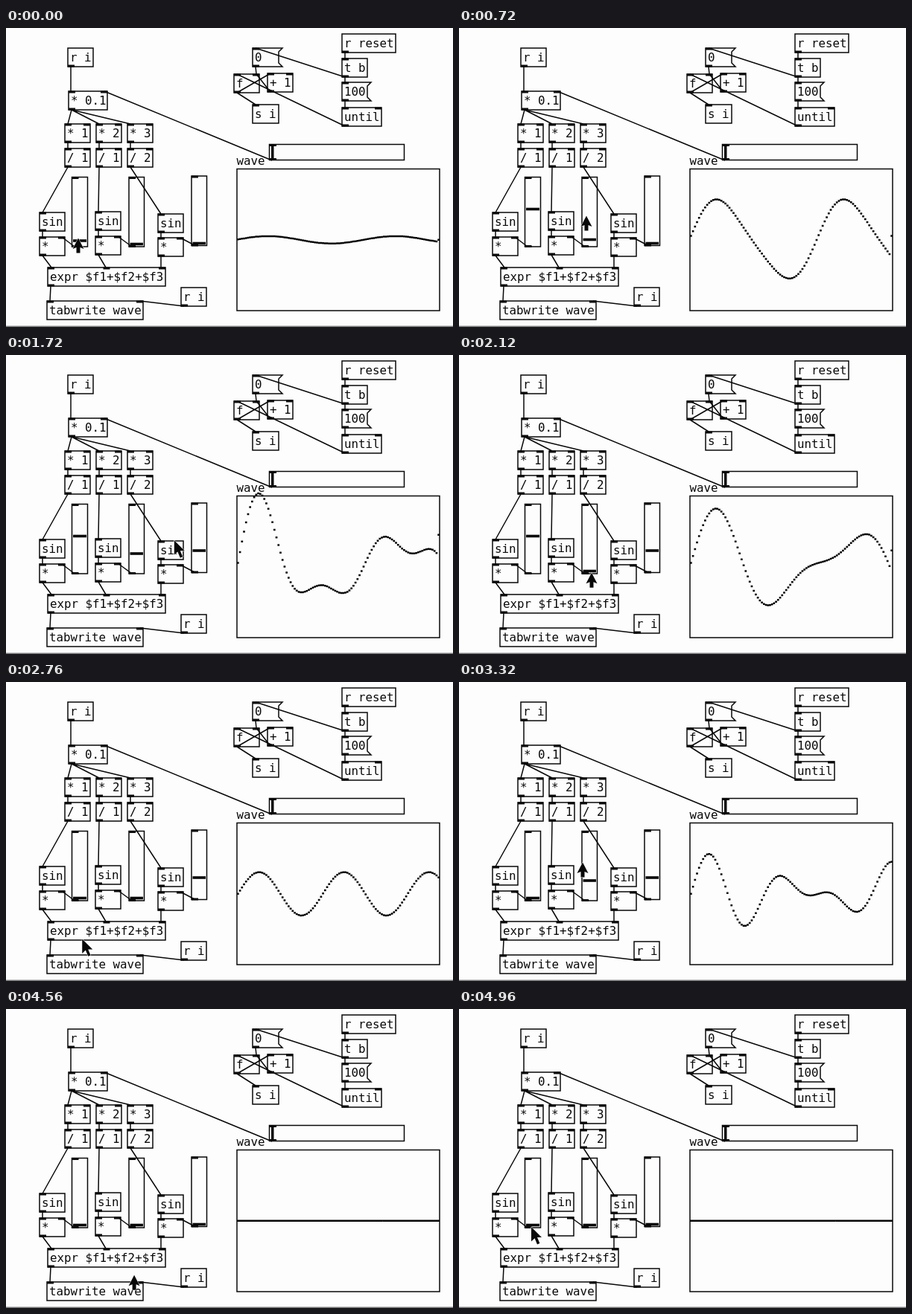
These frames come from a looping animation (600x402 px, 5000 ms). An HTML page:

```html
<!DOCTYPE html>
<html lang="en">
<head>
<meta charset="utf-8">
<title>Additive wave patch</title>
<style>
  html, body { margin: 0; width: 100%; height: 100%; overflow: hidden; background: #fefdfe; }
  svg { display: block; width: 600px; height: 402px; }
  text { font: 15.8px "DejaVu Sans Mono", monospace; white-space: pre; fill: #080808; }
  .line { fill: none; stroke: #080808; stroke-width: 1.5; }
  .solid { fill: #080808; }
  .cursor { fill: #080808; stroke: #fff; stroke-width: 1; paint-order: stroke; }
</style>
</head>
<body>
<svg id="stage" viewBox="0 0 600 402"></svg>
<script>
const stage = document.getElementById('stage');

function add(tag, attrs, text) {
  const el = document.createElementNS('http://www.w3.org/2000/svg', tag);
  for (const k in attrs) el.setAttribute(k, attrs[k]);
  if (text) el.textContent = text;
  return stage.appendChild(el);
}
const path = (d, cls = 'line') => add('path', { d, class: cls });
const frame = (x, y, width, height) => add('rect', { x, y, width, height, class: 'line' });
const bar = (x, y, width, height) => add('rect', { x, y, width, height, class: 'solid' });
const label = (x, y, s) => add('text', { x, y }, s);

// Evenly spread inlets or outlets along a box edge
function ports(x, y, w, n) {
  for (let i = 0; i < n; i++) bar(x + (n > 1 ? i * (w - 9) / (n - 1) : 0), y, 9, 3);
}
function box(x, y, w, s, ins, outs) {
  frame(x, y, w, 25);
  ports(x, y - 0.5, w, ins);
  ports(x, y + 22.5, w, outs);
  label(x + 3, y + 18, s);
}
function message(x, y, w, s) {
  path(`M${x} ${y}h${w}l-5 5v15l5 5h${-w}z`);
  ports(x, y - 0.5, w, 1);
  ports(x, y + 22.5, w, 1);
  label(x + 3, y + 18, s);
}

// Wires
path(`M87 52V85 M88 110L83 129 M88 110L125 129 M88 110L167 129
  M83 154V162 M125 154V162 M167 154V162
  M83 187L49 248 M125 187L124 247 M167 187L208 250
  M49 273V281 M124 272V280 M208 275V282
  M49 306L61 322 M124 305L134 322 M208 307V322
  M92 294L75 281 M169 294L150 280 M253 292L234 282
  M357 178L132 85 M60 347L59 367 M239 374L180 367
  M335 52L336 62 M310 87L335 103 M310 87L355 61 M355 86L336 62
  M455 132L310 62 M455 33V41 M455 66V73 M455 66L335 27 M455 98V107`);

box(83, 27, 34, 'r i', 0, 1);
box(84, 85, 52, '* 0.1', 2, 1);
[['* 1', '/ 1'], ['* 2', '/ 1'], ['* 3', '/ 2']].forEach(([mul, div], i) => {
  box(79 + 42 * i, 129, 34, mul, 2, 1);
  box(79 + 42 * i, 162, 34, div, 2, 1);
});
[[45, 248, 281], [120, 247, 280], [204, 250, 282]].forEach(([x, y1, y2]) => {
  box(x, y1, 34, 'sin', 1, 1);
  box(x, y2, 34, '*', 2, 1);
});
box(56, 322, 158, 'expr $f1+$f2+$f3', 3, 1);
box(55, 367, 129, 'tabwrite wave', 2, 0);
box(235, 349, 34, 'r i', 0, 1);
message(331, 27, 40, '0');
box(306, 62, 34, 'f', 2, 1);
box(351, 61, 34, '+ 1', 2, 1);
box(331, 103, 35, 's i', 1, 0);
box(451, 8, 72, 'r reset', 0, 1);
box(451, 41, 34, 't b', 1, 1);
message(451, 73, 39, '100');
box(451, 107, 53, 'until', 2, 1);

// Horizontal slider and array
frame(353.5, 156.5, 181, 21);
ports(354, 156, 181, 1);
ports(354, 175, 181, 1);
bar(356, 158, 3.5, 18);
label(309.5, 184, 'wave');
frame(310, 189.5, 272, 190.5);
add('rect', { x: 0, y: 400.5, width: 600, height: 1.5, fill: '#777' });

const sliders = [
  { x: 88.5, y: 200.5, w: 21, rest: 290.5 },
  { x: 165, y: 200.5, w: 20.5, rest: 290.5 },
  { x: 249, y: 199, w: 20.5, rest: 289.5 }
];
for (const s of sliders) {
  frame(s.x, s.y, s.w, 93.5);
  ports(s.x, s.y - 0.5, s.w, 1);
  ports(s.x, s.y + 91.5, s.w, 1);
  s.knob = bar(s.x + 1.5, 0, s.w - 3, 3.6);
}

const wave = path('');
wave.style.strokeWidth = 2.5;
const upArrow = path('M0-.5L7.5 14L2.5 12V19.5H-2.5V12L-7.5 14Z', 'cursor');
const pointer = path('M0 0V19.5L4.6 15.2L8 23.4L11.4 22L8 14H14Z', 'cursor');

// Pointer stops: time, x, y
const stops = [
  [0, 97, 283], [400, 97, 240.5], [600, 171, 259], [720, 171, 253],
  [1040, 171, 235.5], [1360, 260, 266], [1640, 260, 239.5],
  [1820, 178, 263], [2100, 178, 293], [2200, 178, 296],
  [2440, 92, 284], [2700, 88, 363], [2920, 166, 266.5], [3320, 166, 243],
  [3480, 166, 234.5], [3680, 258, 268], [3880, 257, 314],
  [4080, 257, 299], [4120, 257, 299], [4320, 174, 262], [4600, 172, 364],
  [4840, 75, 300], [4960, 97, 293], [5000, 97, 293]
];
// Drags: slider, start, end
const drags = [
  [0, 0, 400], [1, 600, 1040], [2, 1360, 1640], [1, 1820, 2200],
  [0, 2440, 2700], [1, 2920, 3480], [2, 3680, 4120], [1, 4320, 4600]
];
const LOOP = 5000, STEP = 40, GAIN = 1.1, MID = 284.8;

function pointerAt(t) {
  const i = stops.findIndex(s => s[0] > t);
  const [t0, x0, y0] = stops[i - 1], [t1, x1, y1] = stops[i];
  const u = (t - t0) / (t1 - t0), e = u * u * (3 - 2 * u);
  return [x0 + (x1 - x0) * e, y0 + (y1 - y0) * e];
}

function levelsAt(t) {
  const v = [4.5, 0, 0];
  for (const [i, from, to] of drags) {
    if (t < from) break;
    const moved = pointerAt(from)[1] - pointerAt(Math.min(t, to))[1];
    v[i] = Math.max(0, Math.min(86, v[i] + moved));
  }
  return v;
}

// The 2nd and 3rd terms lag one sample; the last cell holds the wrapped value
function sample(k, [a, b, c]) {
  const first = k < 99 ? a * Math.sin(0.1 * (k + 1)) : 0;
  return first + b * Math.sin(0.2 * k) + c * Math.sin(0.15 * k);
}

function draw(now) {
  const t = Math.floor(now % LOOP / STEP) * STEP;
  const levels = levelsAt(t), [x, y] = pointerAt(t);
  sliders.forEach((s, i) => s.knob.setAttribute('y', s.rest - levels[i] - 1.8));

  let d = '';
  for (let k = 0; k < 100; k++) {
    d += `M${(310 + 2.72 * k).toFixed(2)} ${(MID - GAIN * sample(k, levels)).toFixed(1)}h2.72`;
  }
  wave.setAttribute('d', d);

  const active = drags.some(([, from, to]) => t >= from && t <= to) ||
    sliders.some(s => x > s.x && x < s.x + s.w && y > s.y && y < s.y + 92);
  upArrow.style.display = active ? '' : 'none';
  pointer.style.display = active ? 'none' : '';
  (active ? upArrow : pointer).setAttribute('transform', `translate(${x} ${y})`);
}

let start;
function tick(now) {
  start ??= now;
  draw(Math.max(0, now - start));
  requestAnimationFrame(tick);
}
draw(0);
requestAnimationFrame(tick);
</script>
</body>
</html>
```
